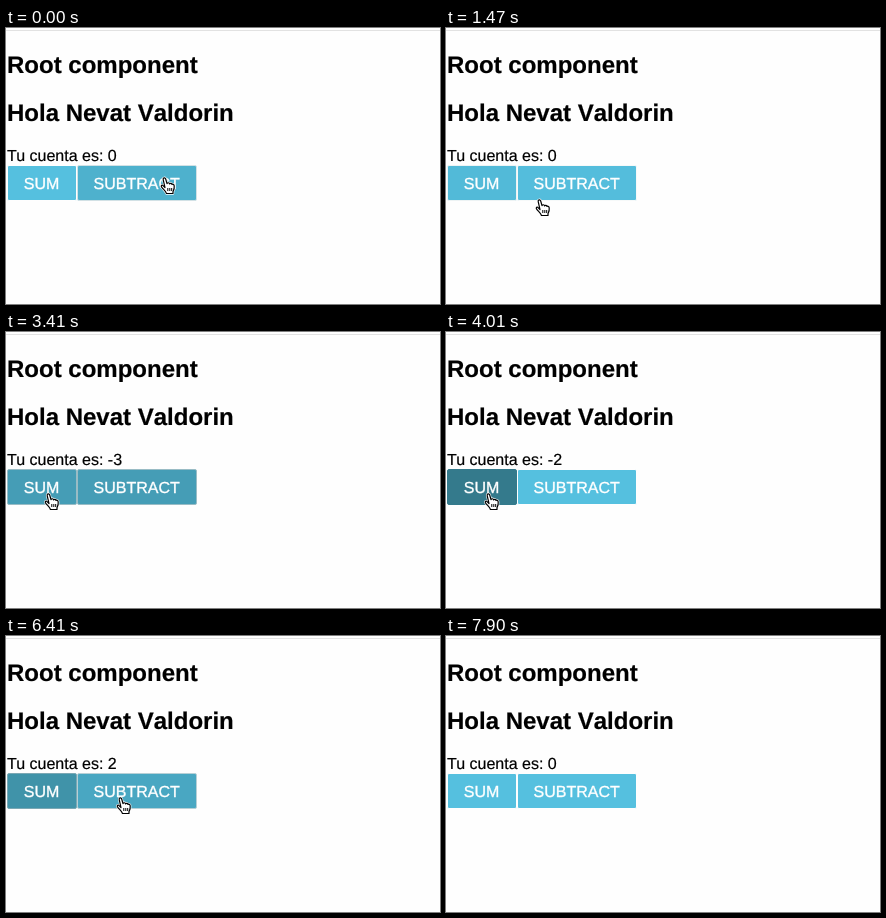
An HTML page that plays this animation: 434x276 px, repeating every 8.81 s.

```html
<!DOCTYPE html>
<html lang="es">
<head>
<meta charset="utf-8">
<title>Counter</title>
<style>
  html, body { margin: 0; width: 100%; height: 100%; overflow: hidden; background: #fefefe; }
  svg { display: block; width: 434px; height: 276px; font: 16px "Liberation Sans", Arial, sans-serif; text-rendering: geometricPrecision; }
  text { stroke: #000; stroke-width: .2px; }
  .heading { font-size: 24px; font-weight: bold; font-kerning: none; }
  .label { fill: #fff; stroke: #fff; stroke-width: .35px; }
</style>
</head>
<body>
<svg viewBox="0 0 434 276">
  <defs>
    <path id="palm" stroke-linejoin="round" d="M5 10.6 3.2 2.6C2.8 .6 5.2 .2 5.7 2L7 6.6C7.4 5.3 9.4 5.6 9.6 6.8 10.2 5.9 11.8 6.3 12 7.4 13 6.9 14.2 7.6 14.2 9 14.5 12 13.6 13 13 14.5V16.5H6.5C6 14.5 3.6 12.6 2 10.6 .6 9 1.4 7.8 2.8 8.3Z"/>
  </defs>
  <rect y="2" width="434" height="1" fill="#e2e2e2"/>
  <text class="heading" x="1" y="45">Root component</text>
  <text class="heading" x="1" y="93">Hola Nevat Valdorin</text>
  <text id="count" x="1" y="133"></text>
  <rect id="sum" x="1.5" y="137.5" width="69" height="35" rx="1.5"/>
  <rect id="subtract" x="71.5" y="137.5" width="119" height="35" rx="1.5"/>
  <text class="label" x="17.8" y="161">SUM</text>
  <text class="label" x="87.6" y="161">SUBTRACT</text>
  <g id="hand">
    <use href="#palm" stroke="#fff" stroke-width="2.4"/>
    <use href="#palm" fill="#fff" stroke="#000" stroke-width="1.2"/>
    <path stroke="#000" d="M7.8 11v3M9.8 11v3M11.7 11v3"/>
  </g>
</svg>
<script>
const LOOP = 8810, REFRESH = 149, FADE = 500;
const HOVER_START = -145;  // the hand is already on a button when the loop starts
const PAGE = [254, 254, 254], BLUE = [85, 192, 223], DARK = [52, 122, 140];

const buttons = [
  { id: 'sum', left: 1, right: 71, sign: 1, clicks: [3950, 4400, 4850, 5150, 5600] },
  { id: 'subtract', left: 71, right: 191, sign: -1, clicks: [1850, 2450, 3050, 6800, 7080] }
];

// Stops of the hand: time, left, top
const stops = [
  [0, 154, 149], [440, 40, 174], [640, 16, 167], [800, 16, 167], [1150, 70, 177], [1330, 89, 171],
  [2970, 89, 171], [3420, 38, 161], [6000, 38, 161], [6560, 126, 161], [7300, 126, 161], [7900, 450, 300]
];

const byId = id => document.getElementById(id);
const clamp = v => Math.min(1, Math.max(0, v));
const smooth = p => p * p * (3 - 2 * p);
const blend = (from, to, p) => from.map((v, i) => v + (to[i] - v) * p);
const rgb = color => `rgb(${color.map(Math.round)})`;

function handAt(t) {
  const next = Math.max(1, stops.findIndex(stop => stop[0] > t));
  if (t >= LOOP || t >= stops[stops.length - 1][0]) return stops[stops.length - 1].slice(1);
  const [t0, ...from] = stops[next - 1], [t1, ...to] = stops[next];
  return blend(from, to, smooth(clamp((t - t0) / (t1 - t0))));
}

function isOver(button, t) {
  const [x, y] = handAt(t), tip = x + 5;
  return tip >= button.left && tip < button.right && y > 136 && y < 172;
}

// Fades in while the fingertip is over the button and out otherwise
function hoverAmount(button, t) {
  const step = 10;
  let p = 0;
  for (let s = HOVER_START; s < t; s += step) {
    p = clamp(p + (isOver(button, s) ? step : -step) / FADE);
  }
  return smooth(p);
}

function draw(time) {
  const t = Math.floor((time + 18) / REFRESH) * REFRESH;
  let count = 0;
  for (const button of buttons) {
    const amount = hoverAmount(button, t);
    byId(button.id).setAttribute('fill', rgb(blend(BLUE, DARK, amount)));
    byId(button.id).setAttribute('stroke', rgb(blend(PAGE, DARK, amount)));
    count += button.sign * button.clicks.filter(click => click <= t).length;
  }
  byId('count').textContent = `Tu cuenta es: ${count}`;
  byId('hand').setAttribute('transform', `translate(${handAt(t).map(Math.round)})`);
}

const start = performance.now();
function tick() {
  draw((performance.now() - start) % LOOP);
  requestAnimationFrame(tick);
}
tick();
</script>
</body>
</html>
```
